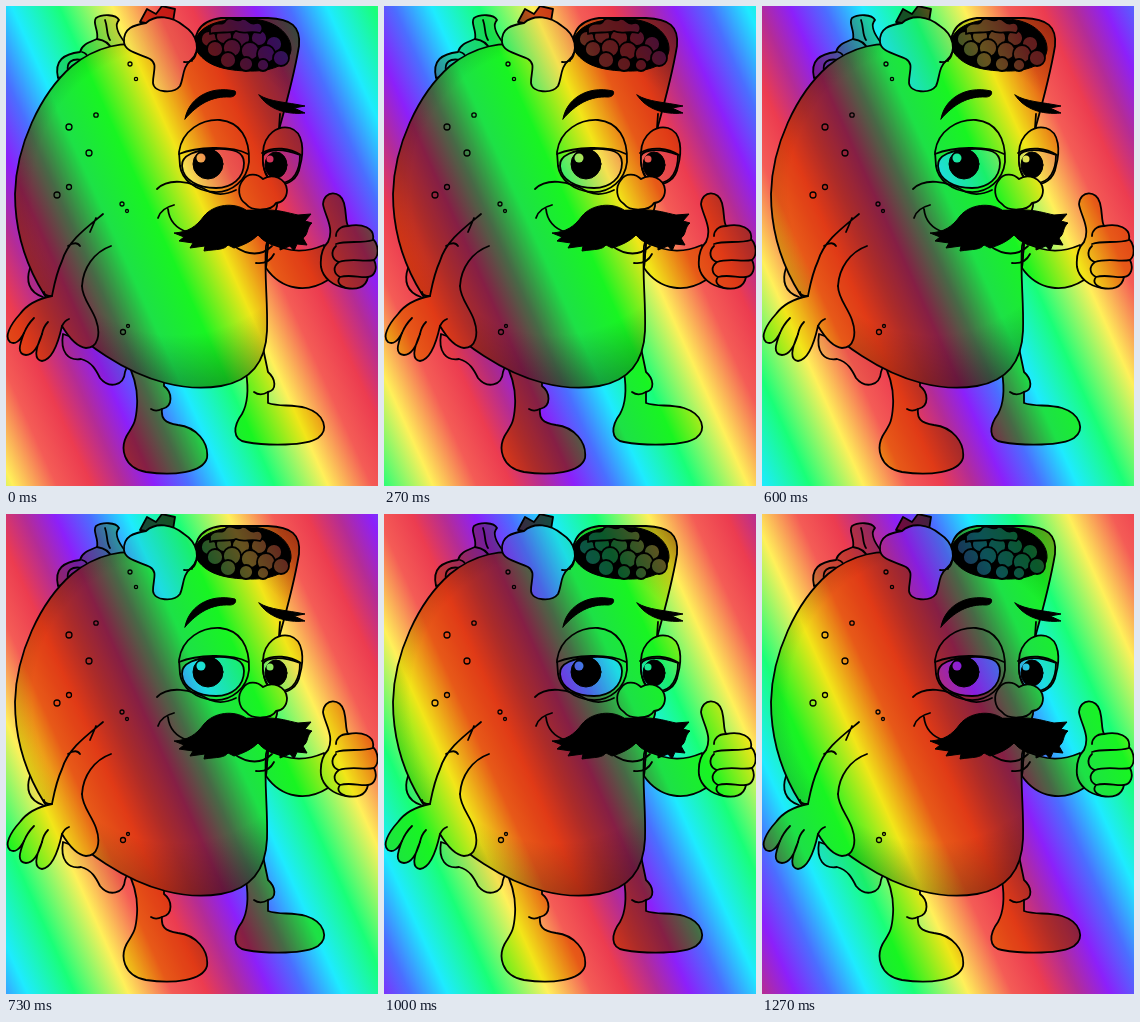
These frames come from a looping animation (372 px wide and 480 px high, 1.33 s). An HTML page with a canvas:

```html
<!DOCTYPE html>
<html lang="en">
<head>
<meta charset="utf-8">
<title>Rainbow taco</title>
<style>
  html, body { margin: 0; width: 372px; height: 480px; overflow: hidden; }
  body { position: relative; isolation: isolate; }
  canvas, svg { position: absolute; left: 0; top: 0; display: block; }
  svg { mix-blend-mode: multiply; }
  .ink { fill: none; stroke: #000; stroke-width: 1.8; stroke-linecap: round; stroke-linejoin: round; }
  .skin { fill: #f2f546; }
  .shell { fill: url(#shade); }
  .cream { fill: #f6efe4; }
  .leaf { fill: #d3dfa0; }
  .tomato { fill: #d05040; }
  .meat { fill: #665858; }
  .black { fill: #000; stroke-width: 1; }
</style>
</head>
<body>
<canvas id="stage" width="372" height="480"></canvas>
<svg width="372" height="480" viewBox="0 0 372 480">
  <defs>
    <radialGradient id="shade" gradientUnits="userSpaceOnUse" cx="170" cy="185" r="200">
      <stop offset=".72" stop-color="#f2f546"/>
      <stop offset="1" stop-color="#b0ad3c"/>
    </radialGradient>
  </defs>
  <g class="ink">
    <!-- fillings behind the shell -->
    <path class="leaf" d="M52,72C48,54 58,48 74,46C76,38 84,36 91,33C93,24 86,17 90,12C96,8 110,8 113,14C108,19 112,28 120,38L112,60Z"/>
    <path d="M62,66C60,56 66,52 76,54M76,46C84,48 82,56 78,60M91,33C98,34 104,38 106,44M99,14C102,22 100,28 104,34"/>
    <path class="tomato" d="M134,16L141,3L150,8L156,0L169,3L166,22Z"/>
    <path class="cream" d="M57,328C54,346 62,355 75,353C86,356 90,364 94,372C103,383 118,380 119,366L124,352ZM24,262C20,274 22,286 37,291"/>

    <!-- legs -->
    <path class="skin" d="M120,354C129,370 132,385 131,400C130,415 128,418 123,426C112,442 118,462 140,466C166,470 197,467 201,452C203,436 190,421 172,419C158,417 155,412 156,403C168,400 166,386 158,380L158,356Z"/>
    <path d="M156,403C152,405 148,405 145,403"/>
    <path class="skin" d="M240,366C243,385 241,399 236,408C227,420 226,434 240,436C262,440 300,440 312,432C323,424 319,408 300,402C285,398 274,401 262,397L262,386C271,384 270,373 262,366L257,342Z"/>
    <path d="M262,386C257,389 252,389 248,386"/>

    <!-- thumbs-up arm -->
    <path class="skin" d="M262,236C285,248 302,246 318,239L322,274C302,287 276,285 260,262Z"/>
    <path class="skin" d="M322,236C329,222 318,208 317,198C318,184 335,184 338,197C341,209 339,214 342,220C356,217 369,222 367,233C373,239 373,250 368,254C372,262 369,270 362,271C360,282 350,284 340,282C327,280 317,272 315,261C314,250 316,242 322,236Z"/>
    <path d="M342,220C334,220 330,225 330,230M330,238C341,234 355,238 367,234M330,240C324,246 326,254 333,256C345,252 357,256 368,254M333,256C326,261 328,268 334,271C344,268 354,272 362,271M334,271C330,276 334,280 340,282"/>

    <!-- shell -->
    <path class="shell" d="M150,42C118,32 88,42 66,60C34,88 10,140 9,188C9,250 40,312 100,350C140,376 180,386 215,380C250,374 260,350 261,325C262,295 258,270 260,240L271,200L274,120C281,95 288,70 293,40C295,20 285,13 262,12L215,12C190,15 188,30 186,55Z"/>
    <path class="black" d="M188,40C190,18 215,13 240,13C268,12 286,28 285,44C283,60 264,66 240,65C214,64 196,58 188,40Z"/>
    <g id="meat" class="meat"></g>
    <path class="meat" d="M204,22C210,13 216,22 220,14C226,9 230,18 236,13C243,12 243,20 250,17C257,16 258,24 254,27C244,24 238,29 230,25C222,28 214,25 204,28Z"/>
    <path class="cream" d="M118,36C117,22 128,19 140,17C150,8 166,10 178,20C192,29 195,45 185,54C176,61 178,72 174,80C168,88 148,87 147,77C147,65 152,58 144,53C136,48 119,47 118,36Z"/>
    <path d="M178,56C184,57 189,53 190,47"/>

    <!-- hanging arm -->
    <path class="skin" stroke="none" d="M97,210C80,222 62,235 56,255C50,268 48,280 46,290L76,290C76,264 88,246 105,240Z"/>
    <path class="skin" d="M76,280C76,292 86,302 90,314C95,328 92,342 80,342C70,341 62,330 56,320C52,338 46,354 36,355C27,354 30,342 36,328C32,342 26,349 20,349C11,348 13,340 18,327C14,335 9,339 4,336C-2,331 4,319 14,308C22,297 36,292 46,290"/>
    <path d="M97,208C80,222 62,235 56,255C50,268 48,280 46,290M105,240C88,246 77,262 76,280M90,212L84,226M62,240C68,236 72,237 74,240M46,290C40,290 38,288 38,286M56,320C58,316 60,314 63,313M18,327C20,322 24,316 28,312M36,328C37,323 39,319 42,316"/>

    <!-- freckles -->
    <g id="freckles" stroke-width="1.3"></g>

    <!-- eyes -->
    <path class="skin" d="M173,146C176,124 196,113 214,114C234,116 244,132 243,156C241,174 226,187 208,186C190,185 176,174 174,160Z"/>
    <path class="cream" d="M176,160C175,149 190,144 208,143C228,142 238,146 238,157C238,172 226,182 210,182C192,182 177,174 176,160Z"/>
    <path class="skin" d="M257,146C258,128 272,119 284,122C298,126 298,146 294,160C292,173 282,180 270,178C260,174 256,162 257,146Z"/>
    <path class="cream" d="M257,150C260,143 276,142 294,149C294,164 288,177 274,177C262,177 256,164 257,150Z"/>
    <path d="M173,148C190,141 224,139 242,148M256,147C268,140 284,142 295,149M151,183C162,172 184,174 204,186C214,190 222,188 230,184"/>
    <circle class="black" cx="202" cy="158" r="15"/>
    <ellipse class="black" cx="270" cy="159" rx="11" ry="13"/>
    <g class="cream" stroke="none"><circle cx="195" cy="152" r="4.5"/><circle cx="264" cy="153" r="3.5"/></g>
    <path class="black" d="M179,113C182,94 202,79 229,85C231,88 228,91 224,91C206,90 192,98 179,113ZM253,89C264,96 280,96 299,100L288,102L299,107C280,109 262,103 253,89Z"/>
    <path d="M274,108L273,122"/>

    <!-- nose, mouth, moustache -->
    <path d="M152,212C154,205 160,201 168,199M162,203C163,214 170,223 182,226M228,240C242,250 256,250 266,240M250,257C258,258 264,256 268,248M260,262L262,238"/>
    <path class="black" d="M240,204C228,196 208,198 198,210C190,221 182,226 168,227L178,231L173,235L187,237L184,242L199,240L198,245C212,243 218,244 222,239L228,242C238,239 246,235 252,229C258,236 266,240 274,240L274,244L284,240L288,245L291,238L301,239L297,232C303,228 300,222 306,217L299,215L305,208L292,209C282,207 274,204 262,204Z"/>
    <path class="skin" d="M237,174C242,166 252,168 257,173C266,167 280,172 281,184C281,193 275,197 270,197C266,205 246,206 240,198C232,193 231,181 237,174Z"/>
  </g>
</svg>
<script>
  const circles = (id, list) => {
    document.getElementById(id).innerHTML = list
      .map(([x, y, r]) => `<circle cx="${x}" cy="${y}" r="${r}"/>`).join('');
  };
  circles('meat', [
    [203, 33, 8], [218, 30, 8], [235, 32, 9], [253, 32, 8], [268, 38, 8], [209, 43, 8],
    [226, 42, 9], [244, 45, 9], [260, 48, 9], [275, 52, 8], [222, 54, 8], [240, 58, 7], [257, 59, 6]
  ]);
  circles('freckles', [
    [124, 58, 2], [130, 73, 1.6], [90, 109, 2.2], [63, 121, 3], [83, 147, 3], [63, 181, 2.5],
    [51, 189, 3], [116, 198, 2], [121, 205, 1.5], [122, 320, 1.5], [117, 326, 2.5]
  ]);

  const W = 372, H = 480;
  const PERIOD = 315, SLANT = 0.45, START = -130;
  const LOOP = 1330, STEP = 1000 / 15, STEPS_PER_PERIOD = 30;
  const rainbow = [
    [0, '#ec3c50'], [.1, '#b42c96'], [.2, '#8c20fa'], [.31, '#4b6eff'], [.43, '#1eebff'],
    [.58, '#19ff78'], [.75, '#fff05a'], [.89, '#f45c56'], [1, '#ec3c50']
  ];
  const ctx = document.getElementById('stage').getContext('2d');

  // Bands follow x - SLANT * y; the loop restarts before a full period has passed.
  function draw(now) {
    const step = Math.floor((now % LOOP + 4) / STEP);
    const from = START - PERIOD + step * PERIOD / STEPS_PER_PERIOD - PERIOD;
    const cycles = 4, to = from + cycles * PERIOD, k = 1 / (1 + SLANT * SLANT);
    const bands = ctx.createLinearGradient(from * k, -SLANT * from * k, to * k, -SLANT * to * k);
    for (let c = 0; c < cycles; c++)
      for (const [pos, color] of rainbow) bands.addColorStop((c + pos) / cycles, color);
    ctx.fillStyle = bands;
    ctx.fillRect(0, 0, W, H);
    requestAnimationFrame(draw);
  }
  draw(0);
</script>
</body>
</html>
```
